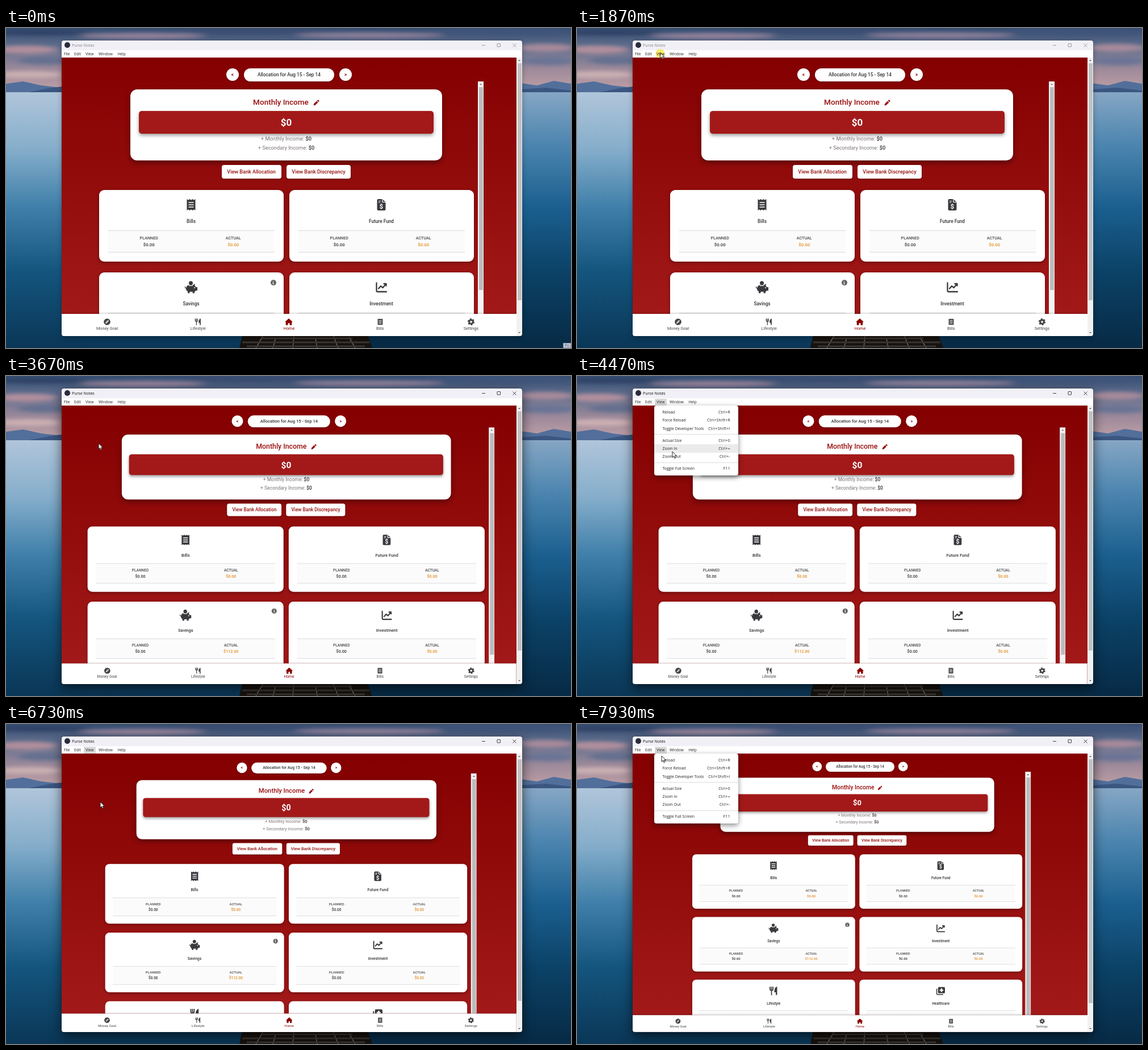
An HTML page that plays this animation: 995 by 563 pixels, repeating every 8 s.

```html
<!DOCTYPE html>
<html lang="en">
<head>
<meta charset="utf-8">
<title>Budget window zoom</title>
<style>
*{box-sizing:border-box}
html,body{margin:0;width:100%;height:100%;overflow:hidden}
body{position:relative;font-family:Roboto,sans-serif;background:#0d3a58}
.abs,.abs>*{position:absolute}
#scene{position:absolute;left:0;top:0}
.hint{left:981px;top:554px;width:14px;height:9px;overflow:hidden;background:#c3cddb;border:1px solid #8290a6;color:#445;font:6.5px/8px "Open Sans",sans-serif;padding-left:2px;animation:hint 8s step-end infinite}

/* window chrome */
.win{left:98px;top:22px;width:811px;height:520px;border-radius:4px;font-family:"Open Sans",sans-serif;animation:focus 8s step-end infinite}
.bar{left:0;top:0;width:811px;height:30px;border-radius:4px 4px 0 0;background:linear-gradient(#f1f0f6 17px,#fff 17px)}
.logo{left:5px;top:3px;width:10px;height:10px;border-radius:50%;background:#292b3b}
.title{left:18px;top:3px;font-size:7px;line-height:11px;white-space:nowrap}
.controls{left:738px;top:4px}
.tab{top:18px;color:#222;font-size:6.6px;line-height:11px;z-index:1}
.tabHover{left:39px;top:17.5px;width:21px;height:12px;border-radius:1px;background:#dadada;animation:tab 8s step-end infinite}
.outer{left:801px;top:30px;width:10px;height:490px;background:#f1f1f1;border-radius:0 0 4px 0}
.outer i{left:2px;top:10px;width:7px;background:#c1c1c1;animation:thumb 8s step-end infinite}
.arrow{width:0;height:0;border:2.3px solid transparent;border-top-width:0;border-bottom:2.8px solid #555}
.arrow.down{transform:rotate(180deg)}

/* page */
.view{left:0;top:30px;width:801px;height:490px;overflow:hidden;border-radius:0 0 0 4px;background:linear-gradient(#840000,#a51b1b)}
.page{position:absolute;left:0;top:0;width:calc(801px/var(--z));height:calc(490px/var(--z));transform-origin:0 0;transform:scale(var(--z));font-family:Roboto,sans-serif;color:#333;animation:zoom 8s step-end infinite}
.period{position:absolute;top:18.5px;width:100%;height:23px;display:flex;align-items:center;justify-content:center;gap:9.5px;font-size:8.3px;font-weight:500}
.period *{background:#fff;border-radius:12px;text-align:center;box-shadow:0 1px 3px #0004}
.period b{width:22px;height:22px;line-height:22px;color:#8b0000;font-weight:700}
.period span{width:158.5px;height:23px;line-height:23px}
.scroll{position:absolute;left:50%;top:42px;bottom:39.5px;width:var(--w);margin-left:calc(var(--w)/-2);overflow:hidden}
.content{position:absolute;inset:0 calc(10px/var(--z)) 0 0}
.track{position:absolute;right:0;top:0;width:10px;height:900px;background:#f4f4f4;transform-origin:100% 0;transform:scale(calc(1/var(--z)))}
.track *{position:absolute}
.track i{left:2px;top:10px;width:6.5px;height:var(--th);background:#bcbcbc}
.income{position:absolute;left:9.35%;width:81.3%;top:14px;height:125px;border-radius:12px;background:#fff;text-align:center;box-shadow:0 4px 10px #0006}
.income>*{position:absolute;left:0;right:0;line-height:20px}
.income h1{margin:0;top:12px;font-size:13.55px;font-weight:500;color:#9a0f0f}
.income h1 svg{width:11px;height:11px;margin:0 0 -2px 8px}
.income .sum{left:14.5px;right:14.5px;top:38px;height:40px;border-radius:5px;background:#a31919;color:#fff;font-size:17px;font-weight:700;line-height:40px;box-shadow:0 3px 6px #0006}
.income p{margin:0;font-size:9.3px;color:#7c7474}
.income p b{color:#3a3030;font-weight:500}
.links{position:absolute;top:147px;width:100%;display:flex;justify-content:center;gap:9px;font-size:9.05px;font-weight:500;color:#971010}
.links span{height:24px;line-height:24px;padding:0 9.7px;border-radius:4px;background:#fff;white-space:nowrap;box-shadow:0 1px 3px #0005}
.grid{position:absolute;left:7.5px;right:7.5px;top:191px;display:grid;grid-template-columns:1fr 1fr;gap:19px 10px}
.card{position:relative;height:126px;border-radius:9px;background:#fff;text-align:center;box-shadow:0 2px 6px #0005}
.card>*{position:absolute}
.card>svg{left:50%;top:14px;width:24px;height:24px;margin-left:-12px;color:#3a3a3e}
.card .name{left:0;right:0;top:50px;font-size:8.29px;line-height:10px;font-weight:500}
.card .info{right:13px;top:12.5px;width:10px;height:10px;border-radius:50%;background:#666;color:#fff;font:700 7.5px/10px "Noto Serif",serif}
.stats{left:16px;right:16px;top:70.5px;height:39px;display:grid;grid-template-columns:1fr 1fr;gap:4px;background:#fbfbfb;border:solid #d9d9d9;border-width:1px 0;padding-top:7px;font-size:7.8px;font-weight:500;line-height:12.5px}
.stats small{display:block;font-size:7.2px;color:#4a4a4a}
.stats .due{color:#e38d22}
.nav{position:absolute;left:0;right:0;bottom:0;height:39.5px;display:grid;grid-template-columns:repeat(5,1fr);background:#fff;text-align:center;font-size:7.25px;color:#444;box-shadow:0 -1px 4px #0003}
.nav svg{display:block;width:14px;height:14px;margin:7px auto 0}
.nav span{display:block;line-height:10px}
.nav .on{color:#8b0000}

/* menu */
.menu{left:38px;top:29.5px;width:148px;height:123.5px;border-radius:4px;overflow:hidden;background:#fff;color:#222;font-size:6.8px}
.menuBox{left:0;top:0;filter:drop-shadow(0 3px 5px #0007);animation:menu 8s step-end infinite}
.item{left:14.5px;width:119.5px;line-height:14px;display:flex;justify-content:space-between;white-space:nowrap}
.item span{letter-spacing:.3px}
.rule{left:0;width:100%;height:1px;background:#dcdcdc}
.hover{left:0;width:100%;height:14.5px;background:#ebebeb;animation:hover 8s step-end infinite}

.cursor{left:0;top:0;animation:move 8s linear infinite}
.ring{left:-8px;top:-6px;width:16px;height:16px;border-radius:50%;background:#f6e52fb8;animation:press 8s step-end infinite}
.cursor svg{overflow:visible;left:0;top:0}

@keyframes hint{0%{opacity:1}.875%,to{opacity:0}}
@keyframes focus{
  0%{color:#85858c;box-shadow:0 0 1px #0008,0 3px 10px #0004}
  24.25%,to{color:#111;box-shadow:0 0 1px #000a,0 7px 20px #0009}
}
@keyframes zoom{
  0%{--z:1;--w:685px;--th:357px}
  45%{--z:.9129;--w:792px;--th:390px}
  63.5%{--z:.8333;--w:792px;--th:450px}
  85.9%,to{--z:.7607;--w:792px;--th:450px}
}
@keyframes thumb{0%{height:417px}45%{height:421px}63.5%{height:425px}85.9%,to{height:429px}}
@keyframes menu{0%,44.1%,62.2%,83.2%{visibility:hidden}26%,53.3%,74.1%,95.6%,to{visibility:visible}}
@keyframes tab{0%,45.5%,63.6%,86%{opacity:0}26%,53.3%,74.1%,95.6%,to{opacity:1}}
@keyframes hover{
  0%,44.1%,62.2%,83.2%,to{top:-20px}
  34.4%,54.3%,75.6%{top:19.5px}
  35.2%,54.7%,76.4%{top:33.5px}
  36.2%,55.1%,77.2%{top:54px}
  36.9%,55.5%,77.8%{top:68.5px}
  38.7%,56.6%,78.5%{top:83px}
}
@keyframes press{
  0%,25.1%,44.4%,53.3%,62.2%,73.75%,83.2%,95%,to{opacity:0}
  22.4%,42.9%,51.6%,60.4%,71.5%,81.6%,93%{opacity:1}
}
@keyframes move{
  0%,.9%{transform:translate(1000px,570px)}
  11.25%{transform:translate(720px,380px)}
  17.5%{transform:translate(380px,185px)}
  21.6%{transform:translate(165px,58px)}
  22.9%,33.1%{transform:translate(146.5px,43px)}
  37.5%{transform:translate(168px,131.5px)}
  40%,44.5%{transform:translate(167px,138px)}
  51.2%,53.6%{transform:translate(148px,44px)}
  55.9%{transform:translate(168px,133.5px)}
  57.5%,63.5%{transform:translate(167px,138px)}
  71%,74.4%{transform:translate(149px,45px)}
  78.8%,85%{transform:translate(166px,137px)}
  92.5%,97%{transform:translate(148px,44px)}
  99.125%{transform:translate(149px,56px)}
  to{transform:translate(149px,60px)}
}
</style>
</head>
<body class="abs">
<svg id="scene" width="995" height="563">
  <defs>
    <linearGradient id="sky" x2="0" y2="1"><stop stop-color="#344c70"/><stop offset=".3" stop-color="#63708f"/><stop offset=".65" stop-color="#a08b9b"/><stop offset="1" stop-color="#c3a3a8"/></linearGradient>
    <linearGradient id="seaL" x2="0" y2="1"><stop stop-color="#b0c5da"/><stop offset=".22" stop-color="#86aecb"/><stop offset=".45" stop-color="#3f7fa9"/><stop offset=".7" stop-color="#14557e"/><stop offset="1" stop-color="#0a3656"/></linearGradient>
    <linearGradient id="seaR" x2="0" y2="1"><stop stop-color="#86a6c4"/><stop offset=".2" stop-color="#4d86b0"/><stop offset=".45" stop-color="#1b5f8f"/><stop offset=".7" stop-color="#0b4267"/><stop offset="1" stop-color="#072a45"/></linearGradient>
    <filter id="soft" x="-50%" y="-80%" width="200%" height="260%"><feGaussianBlur stdDeviation="7 3"/></filter>
    <symbol id="receipt" viewBox="0 0 24 24"><path fill="currentColor" d="M4.5 2l2.5 1.7L9.5 2 12 3.7 14.5 2 17 3.7 19.5 2v20L17 20.3 14.5 22 12 20.3 9.5 22 7 20.3 4.5 22z"/><path stroke="#fff" stroke-width="1.6" d="M7.5 8h9M7.5 12h9M7.5 16h9"/></symbol>
    <symbol id="file" viewBox="0 0 24 24"><path fill="currentColor" d="M6.500 2H14l5.500 5.500V20a2 2 0 0 1-2 2h-11a2 2 0 0 1-2-2V4a2 2 0 0 1 2-2z"/><path fill="none" stroke="#fff" stroke-width="1.200" d="M14 2v5.500h5.500M7 5.500h4M7 8h3"/><text x="12" y="19" text-anchor="middle" font-family="Roboto,sans-serif" font-size="11" font-weight="700" fill="#fff">$</text></symbol>
    <symbol id="pig" viewBox="0 0 24 24"><circle cx="11.500" cy="4.800" r="3.500" fill="currentColor"/><path fill="currentColor" d="M8 8.500h7l4-2.500-.5 3.500 2 2.500H23v6h-2.500L18 20v2.500h-3.500V20h-5v2.500H6V19.500C3.500 18 3 16.500 3 14.500 1 14 .6 12 1 10.500l1 .5c0 1.500.5 2 1.300 2C4 10 5.500 8.500 8 8.500z"/><path stroke="#fff" d="M8 9.300h7"/><circle cx="18" cy="13" r="1" fill="#fff"/></symbol>
    <symbol id="chart" viewBox="0 0 24 24"><path fill="none" stroke="currentColor" stroke-width="2.300" stroke-linecap="round" stroke-linejoin="round" d="M3.500 4.500V18a2 2 0 0 0 2 2H21M7 14.500l4-4.500 3.500 3L20 6.500M16.500 6H20.500V9.500"/></symbol>
    <symbol id="fork" viewBox="0 0 24 24"><path fill="none" stroke="currentColor" stroke-width="2.200" stroke-linecap="round" d="M4 3v5c0 4 7 4 7 0V3M7.500 3v18"/><path fill="currentColor" d="M20.500 2v19.500h-3V15H14C14 7 16 3 20.500 2z"/></symbol>
    <symbol id="care" viewBox="0 0 24 24"><rect x="6" y="3" width="16" height="14.500" rx="2.500" fill="currentColor"/><path fill="none" stroke="currentColor" stroke-width="2" d="M3 7v11.500a2 2 0 0 0 2 2h13"/><path stroke="#fff" stroke-width="3" d="M14 6v8.500M9.800 10.250h8.400"/></symbol>
    <symbol id="compass" viewBox="0 0 24 24"><circle cx="12" cy="12" r="10" fill="currentColor"/><path fill="#fff" d="M17.500 6.500l-3.500 7.500-7.500 3.500L10 10z"/><circle cx="12" cy="12" r="1.500" fill="currentColor"/></symbol>
    <symbol id="home" viewBox="0 0 24 24"><path fill="currentColor" d="M12 1.500L24 12.500h-3V22h-6.500v-6h-5v6H3v-9.500H0z"/></symbol>
    <symbol id="gear" viewBox="0 0 24 24"><circle cx="12" cy="12" r="5.700" fill="none" stroke="currentColor" stroke-width="5"/><circle cx="12" cy="12" r="8.800" fill="none" stroke="currentColor" stroke-width="3.500" stroke-dasharray="4.600 4.615"/></symbol>
    <symbol id="pen" viewBox="0 0 24 24"><path fill="currentColor" d="M1 23l1.500-7L13 5.500l5.500 5.500L8 21.500zM14.500 4L17 1.500q1.500-1 3 0L22.500 4q1 1.500 0 3L20 9.500z"/></symbol>
  </defs>
  <rect width="995" height="115" fill="url(#sky)"/>
  <g filter="url(#soft)">
    <ellipse cx="60" cy="8" rx="90" ry="5" fill="#2d4366"/><ellipse cx="240" cy="14" rx="110" ry="5" fill="#94829a"/>
    <ellipse cx="430" cy="5" rx="120" ry="5" fill="#3a4e72"/><ellipse cx="640" cy="13" rx="130" ry="5" fill="#8c7f99"/>
    <ellipse cx="870" cy="6" rx="130" ry="6" fill="#40547a"/><ellipse cx="35" cy="38" rx="55" ry="7" fill="#b18e9c"/>
    <ellipse cx="70" cy="57" rx="50" ry="7" fill="#65708f"/><ellipse cx="950" cy="35" rx="50" ry="7" fill="#a6899a"/>
    <ellipse cx="955" cy="58" rx="48" ry="7" fill="#6a7394"/><ellipse cx="40" cy="82" rx="60" ry="6" fill="#cbb0b2"/>
  </g>
  <path fill="#526f9b" d="M0 98L30 94 62 101 98 105V115H0zM900 96L935 101 965 93 995 98V115H900z"/>
  <path fill="#3a5681" d="M40 113L75 106 98 103V114zM905 108L950 105 995 110V115H905z"/>
  <rect y="113" width="500" height="450" fill="url(#seaL)"/><rect x="500" y="113" width="495" height="450" fill="url(#seaR)"/>
  <path fill="#16120f" d="M416 541H637L645 563H411z"/>
  <g stroke="#6e6a68" stroke-width="1.500"><path d="M440 563l12-20M470 563l5-18M505 563l2-20M548 563l-3-18M585 563l-8-20M615 563l-11-19"/><path stroke="#393430" stroke-width="3" d="M416 553H640M424 560H632M450 546H610"/></g>
</svg>
<div class="hint">Po</div>
<div class="win abs">
  <div class="bar"></div>
  <div class="logo"></div>
  <div class="title">Purse Notes</div>
  <svg class="controls" width="66" height="9" fill="none" stroke="currentColor" stroke-width=".8"><path d="M2 4.500h6M56.500 1.500l6 6M62.500 1.500l-6 6"/><rect x="29" y="1.500" width="5.500" height="5.500" rx=".6"/></svg>
  <div class="tabHover"></div>
  <span class="tab" style="left:4px">File</span><span class="tab" style="left:22px">Edit</span><span class="tab" style="left:42px">View</span><span class="tab" style="left:65px">Window</span><span class="tab" style="left:98.500px">Help</span>
  <div class="view"><div class="page">
    <div class="period"><b>&lt;</b><span>Allocation for Aug 15 - Sep 14</span><b>&gt;</b></div>
    <div class="scroll">
      <div class="content">
        <div class="income">
          <h1>Monthly Income<svg><use href="#pen"/></svg></h1>
          <div class="sum">$0</div>
          <p style="top:77px">+ Monthly Income: <b>$0</b></p>
          <p style="top:93px">+ Secondary Income: <b>$0</b></p>
        </div>
        <div class="links"><span>View Bank Allocation</span><span>View Bank Discrepancy</span></div>
        <div class="grid" id="grid"></div>
      </div>
      <div class="track"><b class="arrow" style="left:2.700px;top:4px"></b><i></i></div>
    </div>
    <div class="nav" id="nav"></div>
  </div></div>
  <div class="outer abs"><b class="arrow" style="left:2.700px;top:4px"></b><i></i><b class="arrow down" style="left:2.700px;top:483px"></b></div>
  <div class="menuBox abs"><div class="menu abs" id="menu"><div class="hover"></div></div></div>
</div>
<div class="cursor abs">
  <div class="ring"></div>
  <svg width="9" height="13"><path d="M0 0V10.200L2.400 8 4 11.800 5.700 11 4.200 7.400H7.400Z" fill="#fff" stroke="#111" stroke-width=".9"/></svg>
</div>
<script>
const fill = (id, rows, html) =>
  document.getElementById(id).insertAdjacentHTML('beforeend', rows.map(html).join(''));
const icon = name => `<svg><use href="#${name}"/></svg>`;

fill('grid', [
  ['receipt', 'Bills'], ['file', 'Future Fund'],
  ['pig', 'Savings', '$112.00'], ['chart', 'Investment'],
  ['fork', 'Lifestyle'], ['care', 'Healthcare']
], ([shape, name, actual = '$0.00']) => `<div class="card">${icon(shape)}
  <div class="name">${name}</div>${name === 'Savings' ? '<div class="info">i</div>' : ''}
  <div class="stats"><div><small>PLANNED</small>$0.00</div>
  <div class="due"><small>ACTUAL</small>${actual}</div></div></div>`);

fill('nav', [
  ['compass', 'Money Goal'], ['fork', 'Lifestyle'], ['home', 'Home'],
  ['receipt', 'Bills'], ['gear', 'Settings']
], ([shape, name]) => `<div class="${name === 'Home' ? 'on' : ''}">${icon(shape)}<span>${name}</span></div>`);

fill('menu', [
  [5, 'Reload', 'Ctrl+R'], [19.5, 'Force Reload', 'Ctrl+Shift+R'],
  [34, 'Toggle Developer Tools', 'Ctrl+Shift+I'], [50.5],
  [55, 'Actual Size', 'Ctrl+0'], [69, 'Zoom In', 'Ctrl+='], [83.5, 'Zoom Out', 'Ctrl+-'],
  [100.5], [104.5, 'Toggle Full Screen', 'F11']
], ([top, name, keys]) => name
  ? `<div class="item" style="top:${top}px">${name}<span>${keys}</span></div>`
  : `<div class="rule" style="top:${top}px"></div>`);
</script>
</body>
</html>
```
